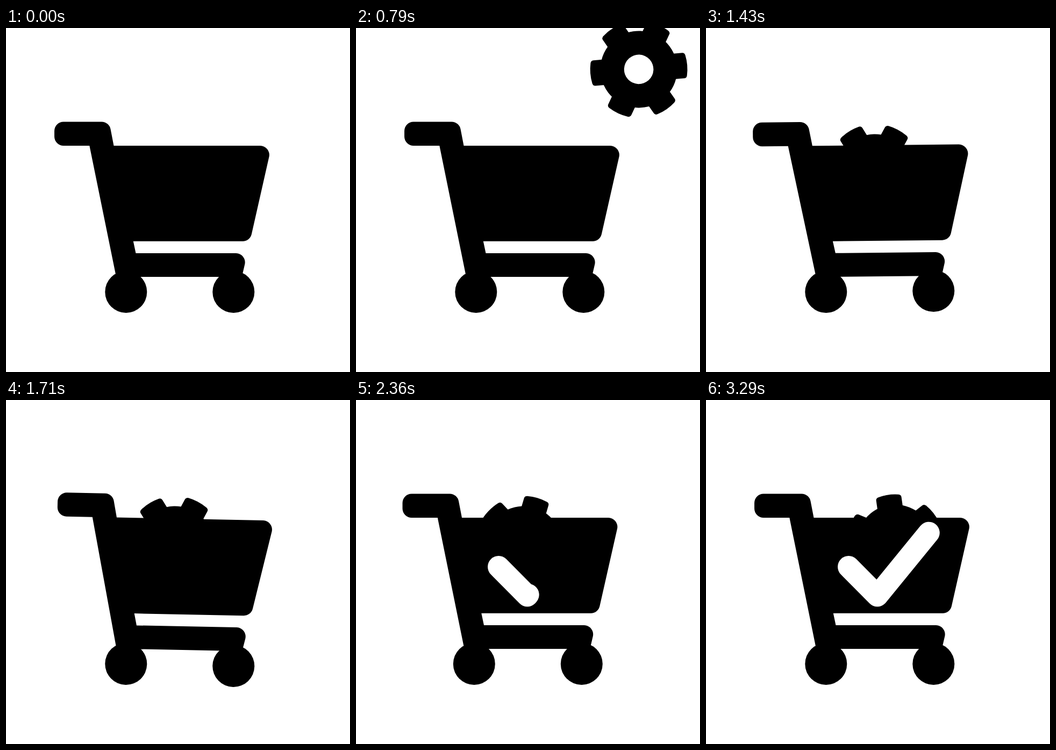
Write an HTML page that moves like this. It is 640 px wide and 640 px high and loops after 4780 ms.

```html
<!DOCTYPE html>
<html lang="en">
<head>
<meta charset="utf-8">
<title>Shopping cart</title>
<style>
  html, body { margin: 0; height: 100%; overflow: hidden; background: #fff; }
  svg { display: block; width: 100%; height: 100%; }
</style>
</head>
<body>
<svg viewBox="0 0 640 640">
  <defs>
    <path id="tooth" d="M-23.7 -60V-83Q-23.7 -87.2 -19 -88.4A90.5 90.5 0 0 1 19 -88.4Q23.7 -87.2 23.7 -83V-60Z"/>
  </defs>
  <g id="gear">
    <circle r="71.5"/>
    <use href="#tooth"/>
    <use href="#tooth" transform="rotate(60)"/>
    <use href="#tooth" transform="rotate(120)"/>
    <use href="#tooth" transform="rotate(180)"/>
    <use href="#tooth" transform="rotate(240)"/>
    <use href="#tooth" transform="rotate(300)"/>
    <circle r="27.3" fill="#fff"/>
  </g>
  <g id="cart">
    <path d="M107 174.5H178A17 17 0 0 1 194.5 188L200.5 219H473A17 17 0 0 1 489.6 239L456.9 383.5A17 17 0 0 1 440.5 396.8H236.8L241.5 419H428A17 17 0 0 1 444.3 439.5L438.8 463H205L155.3 219H107A17 17 0 0 1 90 202V191.5A17 17 0 0 1 107 174.5Z"/>
    <circle cx="223.3" cy="491" r="39"/>
    <circle cx="423.3" cy="491" r="39"/>
  </g>
  <path id="check" d="M265.3 310.3L318.8 364.2L414.5 247" pathLength="100" fill="none"
    stroke="#fff" stroke-width="40.5" stroke-linecap="round" stroke-linejoin="round"/>
</svg>
<script>
const LOOP = 4780, HOLD = 500, STEP = 1000 / 14, LAST = 40;
const GRAVITY = 7.4; // pixels per step squared
const [gear, cart, check] = ['gear', 'cart', 'check'].map(id => document.getElementById(id));

// Eased 0 to 1 between two steps
function ramp(k, from, to) {
  const u = Math.min(1, Math.max(0, (k - from) / (to - from)));
  return (1 - Math.cos(Math.PI * u)) / 2;
}

// Thrown in along an arc, then two hops inside the cart and a roll to the right
function gearPose(k) {
  const flight = k - 5;
  const swing = (82.5 + 21.7 * Math.min(flight, 5.5)) * Math.PI / 180;
  const hop = (peak, top) => top + GRAVITY * (k - peak) ** 2;
  const pop = ramp(k, 19, 23), nudge = ramp(k, 28, 32), roll = ramp(k, 32, LAST);
  return {
    x: 500 + 200 * Math.cos(swing) - 2.5 * pop + 8.5 * nudge + 31.5 * roll,
    y: Math.min(269 - 3 * roll, hop(5.4, 75.7), hop(22.5, 218.6), hop(31.1, 234.5)),
    turn: 25.2 - 19 * Math.min(flight, 6.15) - 11.9 * pop + 1.2 * nudge + 34.2 * roll
  };
}

function draw(now) {
  const t = now % LOOP;
  const k = t < HOLD ? 0 : Math.min(LAST, 1 + Math.floor((t - HOLD + 5) / STEP));

  const { x, y, turn } = gearPose(k);
  gear.style.display = k ? '' : 'none';
  gear.setAttribute('transform', `translate(${x} ${y}) rotate(${turn})`);

  const tilt = -3.4 * ramp(k, 9, 12) + 5.7 * ramp(k, 12, 16) - 2.3 * ramp(k, 16, 20);
  const shift = -7 * (ramp(k, 25, 29) - ramp(k, 29, 34));
  cart.setAttribute('transform', `translate(${shift} 0) rotate(${tilt} 223.3 491)`);

  const drawn = 100 * ramp(k, 25, 30);
  check.style.display = drawn ? '' : 'none';
  check.setAttribute('stroke-dasharray', drawn < 100 ? `${drawn} 200` : 'none');
}

const start = performance.now();
function tick() {
  draw(performance.now() - start);
  requestAnimationFrame(tick);
}
tick();
</script>
</body>
</html>
```
